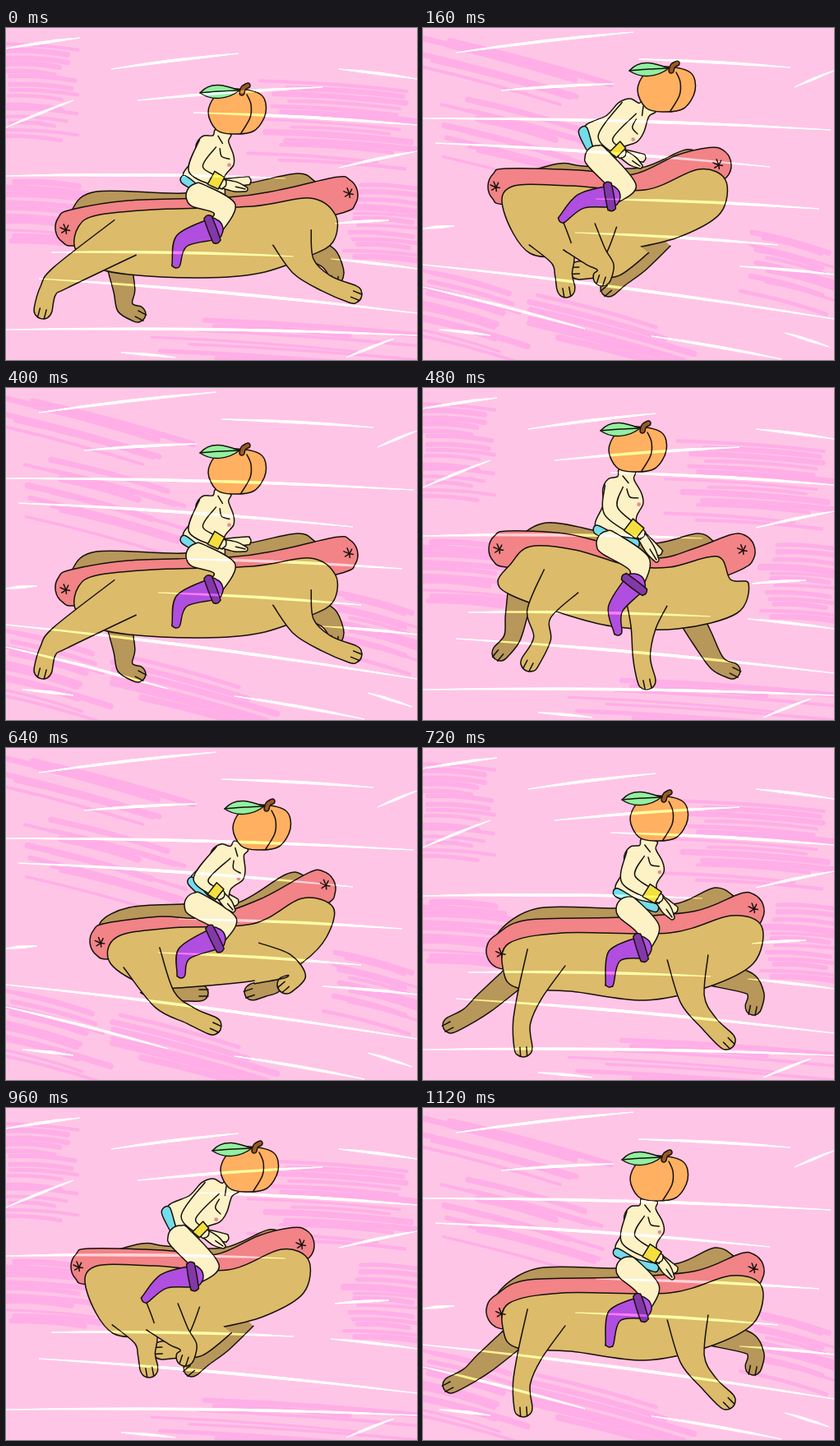
An HTML page with a canvas that plays this animation: 500x404 px, repeating every 1.2 s.

```html
<!DOCTYPE html>
<html lang="en">
<head>
<meta charset="utf-8">
<title>Hot dog gallop</title>
<style>
html, body { margin: 0; width: 500px; height: 404px; overflow: hidden; background: #ffc5e6; }
canvas { display: block; }
</style>
</head>
<body>
<canvas id="stage" width="500" height="404"></canvas>
<script>
const ctx = document.getElementById('stage').getContext('2d');
const STEP = 80, STEPS = 15;
const BUN = '#dcbb6a', DARK = '#b8975a', SAUSAGE = '#f28387', SKIN = '#fdf1c6';
const CYAN = '#74dcea', YELLOW = '#f3df3e', BOOT = '#b04ee0', CUFF = '#8338a8';
const PEACH = '#ffb061', LEAF = '#92f0a0', STEM = '#9a5a26', INK = '#16100c';

// Joints of the dog and the rider, as x, y pairs.
const stretch = {
  bun: [84, 268, 88, 242, 110, 228, 180, 221, 300, 217, 370, 207, 401, 228, 398, 260, 370, 277, 310, 298, 240, 304, 150, 300, 105, 290],
  back: [80, 222, 110, 199, 216, 201, 290, 190, 355, 177, 378, 188],
  sausage: [82, 243, 150, 232, 272, 228, 335, 219, 406, 203],
  far: [[138, 290, 144, 320, 145, 340, 160, 348], [370, 268, 392, 280, 401, 296, 400, 303]],
  near: [[145, 255, 66, 304, 51, 320, 45, 343], [348, 255, 362, 290, 390, 311, 422, 324]],
  torso: [264, 126, 242, 192],
  arm: [231, 172, 262, 189, 291, 196],
  leg: [234, 204, 266, 220, 251, 245, 214, 259, 207, 287],
  head: [-30, 5]
};
const land = {
  bun: [91, 235, 106, 215, 130, 193, 185, 197, 250, 216, 300, 218, 358, 205, 374, 233, 396, 238, 382, 274, 310, 293, 230, 290, 165, 273, 105, 251],
  back: [112, 185, 150, 164, 216, 175, 280, 189, 335, 177, 358, 190],
  sausage: [102, 196, 170, 199, 230, 214, 285, 229, 340, 215, 382, 199],
  far: [[118, 250, 113, 280, 108, 305, 94, 322], [325, 278, 340, 305, 358, 335, 376, 344]],
  near: [[168, 235, 141, 275, 145, 305, 130, 334], [272, 262, 268, 292, 266, 328, 272, 356]],
  torso: [248, 100, 238, 175],
  arm: [229, 150, 264, 177, 284, 209],
  leg: [226, 189, 263, 214, 257, 239, 234, 269, 237, 296],
  head: [-50, -22]
};
const gather = {
  bun: [98, 222, 108, 193, 180, 192, 270, 197, 335, 172, 368, 185, 362, 225, 315, 253, 255, 268, 190, 275, 130, 274],
  back: [108, 182, 165, 165, 195, 168, 265, 170, 320, 148, 342, 158],
  sausage: [101, 193, 190, 195, 258, 200, 315, 176, 353, 167],
  far: [[290, 255, 262, 285, 240, 305, 226, 317]],
  near: [[255, 258, 230, 289, 205, 294, 189, 295], [150, 250, 170, 280, 171, 300, 174, 317], [190, 254, 210, 278, 222, 291, 218, 303]],
  torso: [277, 93, 212, 145],
  arm: [222, 133, 241, 152, 264, 168],
  leg: [212, 158, 246, 196, 227, 205, 192, 211, 170, 232],
  head: [-15, -22]
};
const spring = {
  bun: [127, 262, 135, 230, 200, 219, 300, 214, 360, 183, 398, 194, 390, 230, 362, 260, 325, 279, 235, 290, 175, 290],
  back: [115, 212, 150, 194, 215, 190, 280, 189, 340, 154, 362, 155],
  sausage: [124, 235, 190, 227, 245, 228, 318, 204, 379, 171],
  far: [[172, 285, 190, 297, 212, 298, 236, 298], [325, 278, 322, 288, 312, 293, 300, 297]],
  near: [[165, 255, 193, 306, 225, 326, 251, 338], [305, 262, 342, 266, 354, 277, 341, 288]],
  torso: [286, 118, 248, 176],
  arm: [237, 160, 260, 178, 276, 197],
  leg: [232, 191, 268, 214, 254, 232, 217, 250, 213, 275],
  head: [0, 0]
};
const reach = {
  bun: [98, 272, 104, 238, 170, 225, 300, 225, 375, 204, 412, 217, 402, 262, 346, 291, 270, 307, 180, 296, 115, 292],
  back: [92, 224, 140, 195, 238, 195, 310, 189, 355, 170, 380, 182],
  sausage: [99, 247, 130, 231, 240, 228, 335, 220, 393, 198],
  far: [[110, 280, 75, 310, 55, 326, 34, 337], [355, 275, 395, 286, 405, 300, 402, 315]],
  near: [[150, 255, 130, 300, 120, 335, 122, 365], [322, 255, 328, 306, 348, 335, 369, 356]],
  torso: [275, 112, 262, 180],
  arm: [250, 160, 286, 182, 303, 206],
  leg: [250, 196, 274, 221, 265, 243, 233, 253, 227, 286],
  head: [-24, -11]
};
const POSES = [stretch, land, gather, spring, reach];

// Rider's torso: distance along the spine, then pixels towards the back.
const TORSO = [0, 9, .12, 10, .18, 21, .35, 26, .6, 23, 1, 27, 1.1, -24, .75, -19, .5, -25, .33, -21, .13, -10, 0, -10];
const BRIEFS = [.94, 27, 1.06, 0, 1.08, -24, 1.22, -24, 1.16, 0, 1.08, 28];

// Streaks are x, y, x, y; hatch boxes are x, y, width, height.
const level = {
  seed: 7, slope: .07,
  hatch: [[-20, 18, 110, 118], [290, 62, 230, 100], [-20, 186, 140, 80], [405, 190, 120, 95], [170, 352, 350, 50]],
  streaks: [[0, 25, 90, 12], [128, 50, 283, 31], [160, 88, 385, 72], [405, 50, 500, 62], [0, 121, 82, 88],
    [228, 103, 500, 118], [0, 180, 340, 183], [405, 170, 500, 150], [55, 273, 350, 278], [395, 281, 500, 293],
    [400, 238, 466, 234], [40, 305, 500, 347], [0, 367, 500, 374], [414, 401, 472, 378], [140, 395, 206, 401]]
};
const tilted = {
  seed: 41, slope: .27,
  hatch: [[-20, 4, 250, 48], [20, 84, 200, 75], [385, 245, 140, 80], [-20, 290, 150, 85], [120, 325, 230, 50]],
  streaks: [[40, 30, 256, 5], [95, 76, 232, 68], [262, 38, 447, 48], [452, 72, 500, 52], [0, 110, 496, 124],
    [15, 140, 422, 169], [210, 208, 482, 220], [0, 244, 38, 241], [185, 249, 432, 264], [385, 290, 500, 300],
    [0, 288, 500, 354], [0, 315, 197, 366], [20, 367, 82, 374], [278, 375, 436, 403], [440, 371, 494, 388]]
};
const between = { seed: 23, slope: .16, hatch: level.hatch, streaks: scatter(23, 15) };
const SKIES = [level, between, tilted];

function rng(seed) {
  return () => (seed = seed * 16807 % 2147483647) / 2147483647;
}

function scatter(seed, count) {
  const rand = rng(seed);
  return Array.from({ length: count }, (_, i) => {
    const x = (i * 190) % 400 - 20 + rand() * 60, y = 15 + i * 26, w = 70 + rand() * 190;
    return [x, y, x + w, y + w * (i - 4) * .012];
  });
}

function pairs(list) {
  return Array.from({ length: list.length / 2 }, (_, i) => [list[2 * i], list[2 * i + 1]]);
}

const mix = (a, b, t) => [a[0] + (b[0] - a[0]) * t, a[1] + (b[1] - a[1]) * t];

function heading(a, b) {
  const dx = b[0] - a[0], dy = b[1] - a[1], d = Math.hypot(dx, dy) || 1;
  return [dx / d, dy / d];
}

// Smooth curve through the points.
function curve(pts, closed) {
  const n = pts.length, path = new Path2D();
  const at = i => pts[closed ? (i + n) % n : Math.max(0, Math.min(n - 1, i))];
  path.moveTo(...pts[0]);
  for (let i = 0; i < n - (closed ? 0 : 1); i++) {
    const o = at(i - 1), p = at(i), q = at(i + 1), r = at(i + 2);
    path.bezierCurveTo(p[0] + (q[0] - o[0]) / 6, p[1] + (q[1] - o[1]) / 6,
      q[0] - (r[0] - p[0]) / 6, q[1] - (r[1] - p[1]) / 6, ...q);
  }
  if (closed) path.closePath();
  return path;
}

function paint(path, fill) {
  if (fill) {
    ctx.fillStyle = fill;
    ctx.fill(path);
  }
  ctx.strokeStyle = INK;
  ctx.lineWidth = 1.5;
  ctx.stroke(path);
}

const blob = (pts, fill) => paint(curve(pts, true), fill);
const line = (...pts) => paint(curve(pts));

// Tube of varying radius; an open one has no outline at its root.
function limb(pts, radii, fill, open) {
  const last = pts.length - 1, left = [], right = [];
  pts.forEach((p, i) => {
    const [ux, uy] = heading(pts[Math.max(0, i - 1)], pts[Math.min(last, i + 1)]), r = radii[i] ?? radii[0];
    left.push([p[0] - uy * r, p[1] + ux * r]);
    right.unshift([p[0] + uy * r, p[1] - ux * r]);
  });
  const cap = (from, to, r) => {
    const [ux, uy] = heading(from, to);
    return [-.7, 0, .7].map(s => {
      const c = Math.sqrt(1 - s * s);
      return [to[0] + (ux * c + uy * s) * r, to[1] + (uy * c - ux * s) * r];
    });
  };
  const rim = [...left, ...cap(pts[last - 1], pts[last], radii[last] ?? radii[0]), ...right];
  if (!open) rim.push(...cap(pts[1], pts[0], radii[0]));
  paint(curve(rim, !open), fill);
}

function dogLeg(joints, fill) {
  const pts = pairs(joints), foot = pts[3], [ux, uy] = heading(pts[2], foot);
  limb(pts, fill === DARK ? [15, 13, 10, 10] : [25, 15, 10.5, 11], fill, true);
  for (const side of [-4, 4]) {
    const toe = d => [foot[0] + ux * d - uy * side, foot[1] + uy * d + ux * side];
    line(toe(-1), toe(10));
  }
}

function pucker([x, y]) {
  for (let i = 0; i < 3; i++) {
    const a = .3 + i, dx = 6 * Math.cos(a), dy = 6 * Math.sin(a);
    line([x - dx, y - dy], [x + 1, y + 1], [x + dx, y + dy]);
  }
}

function drawDog(pose) {
  const spine = pairs(pose.sausage);
  pose.far.forEach(leg => dogLeg(leg, DARK));
  blob([...pairs(pose.back), ...spine.slice().reverse()], DARK);
  limb(spine, [22], SAUSAGE);
  blob(pairs(pose.bun), BUN);
  pose.near.forEach(leg => dogLeg(leg, BUN));
  const end = spine.length - 1;
  pucker(mix(spine[0], spine[1], -.15));
  pucker(mix(spine[end], spine[end - 1], -.15));
}

function drawHead([dx, dy]) {
  ctx.save();
  ctx.translate(dx, dy);
  blob(pairs([308, 69, 285, 78, 276, 98, 286, 119, 306, 124, 332, 120, 346, 98, 340, 76]), PEACH);
  line([323, 76], [328, 88], [327, 104], [316, 123]);
  paint(new Path2D('M266,74C280,58 300,66 314,71C300,82 280,84 266,74Z'), LEAF);
  line([266, 74], [290, 72], [312, 71]);
  limb([[317, 74], [319, 68], [324, 65]], [3], STEM);
  ctx.restore();
}

function drawRider(pose) {
  const [neck, hips] = pairs(pose.torso), [ux, uy] = heading(neck, hips);
  const local = ([t, s]) => {
    const p = mix(neck, hips, t);
    return [p[0] - uy * s, p[1] + ux * s];
  };
  const [elbow, wrist, hand] = pairs(pose.arm);
  const [hip, knee, cuff, ankle, toe] = pairs(pose.leg);

  limb([wrist, [hand[0] + 2, hand[1] - 10]], [5, 5], SKIN);
  blob(pairs(TORSO).map(local), SKIN);
  line(...[[.3, -3], [.42, -8], [.42, -18]].map(local));
  line(...[[.1, 4], [.2, -4]].map(local));
  ctx.fillStyle = '#e58a9c';
  ctx.beginPath();
  ctx.arc(...local([.52, -20]), 2.4, 0, Math.PI * 2);
  ctx.fill();
  blob(pairs(BRIEFS).map(local), CYAN);

  limb([hip, knee, cuff], [15, 14, 11], SKIN);
  limb([cuff, ankle, toe], [13, 9, 5], BOOT);
  const [bx, by] = heading(cuff, ankle);
  limb([[cuff[0] - by * 13, cuff[1] + bx * 13], [cuff[0] + by * 13, cuff[1] - bx * 13]], [5, 5], CUFF);

  limb([wrist, mix(wrist, hand, .6), hand], [5, 6, 3], SKIN);
  line(mix(wrist, hand, .6), hand);
  limb([local([.28, 13]), elbow, wrist], [11, 9, 6], SKIN, true);
  const top = mix(elbow, wrist, .6), [ax, ay] = heading(elbow, wrist);
  const band = new Path2D();
  for (const [p, s] of [[top, 9], [wrist, 8], [wrist, -8], [top, -9]]) band.lineTo(p[0] - ay * s, p[1] + ax * s);
  band.closePath();
  paint(band, YELLOW);
  drawHead(pose.head);
}

function drawHatch(sky) {
  const rand = rng(sky.seed);
  ctx.strokeStyle = '#ffaee7';
  for (const [x, y, w, h] of sky.hatch) {
    for (let dy = 0; dy < h; dy += 8) {
      const a = x + rand() * w * .25, b = x + w * (.7 + rand() * .3);
      const rise = (b - a) * sky.slope, top = y + dy + rand() * 4;
      ctx.lineWidth = 3 + rand() * 5;
      ctx.beginPath();
      ctx.moveTo(a, top);
      ctx.quadraticCurveTo((a + b) / 2, top + rise / 2 - 4, b, top + rise);
      ctx.stroke();
    }
  }
}

function drawStreaks(sky, fill) {
  ctx.fillStyle = fill;
  for (const [x0, y0, x1, y1] of sky.streaks) {
    const cx = (x0 + x1) / 2, cy = (y0 + y1) / 2 - (x1 - x0) * .015;
    ctx.beginPath();
    ctx.moveTo(x0, y0 - .5);
    ctx.quadraticCurveTo(cx, cy - 3, x1, y1 - .5);
    ctx.lineTo(x1, y1 + .5);
    ctx.quadraticCurveTo(cx, cy + 3, x0, y0 + .5);
    ctx.fill();
  }
}

function draw(step) {
  const sky = SKIES[step % SKIES.length], pose = POSES[step % POSES.length];
  ctx.lineCap = ctx.lineJoin = 'round';
  ctx.fillStyle = '#ffc5e6';
  ctx.fillRect(0, 0, 500, 404);
  drawHatch(sky);
  drawStreaks(sky, '#fff');
  drawDog(pose);
  drawRider(pose);
  // Streaks glow through the figure.
  ctx.globalCompositeOperation = 'color-dodge';
  drawStreaks(sky, '#606060');
  ctx.globalCompositeOperation = 'source-over';
}

const start = performance.now();
let shown = -1;
function tick() {
  const step = Math.floor((performance.now() - start) / STEP) % STEPS;
  if (step !== shown) draw(shown = step);
  requestAnimationFrame(tick);
}
tick();
</script>
</body>
</html>
```
